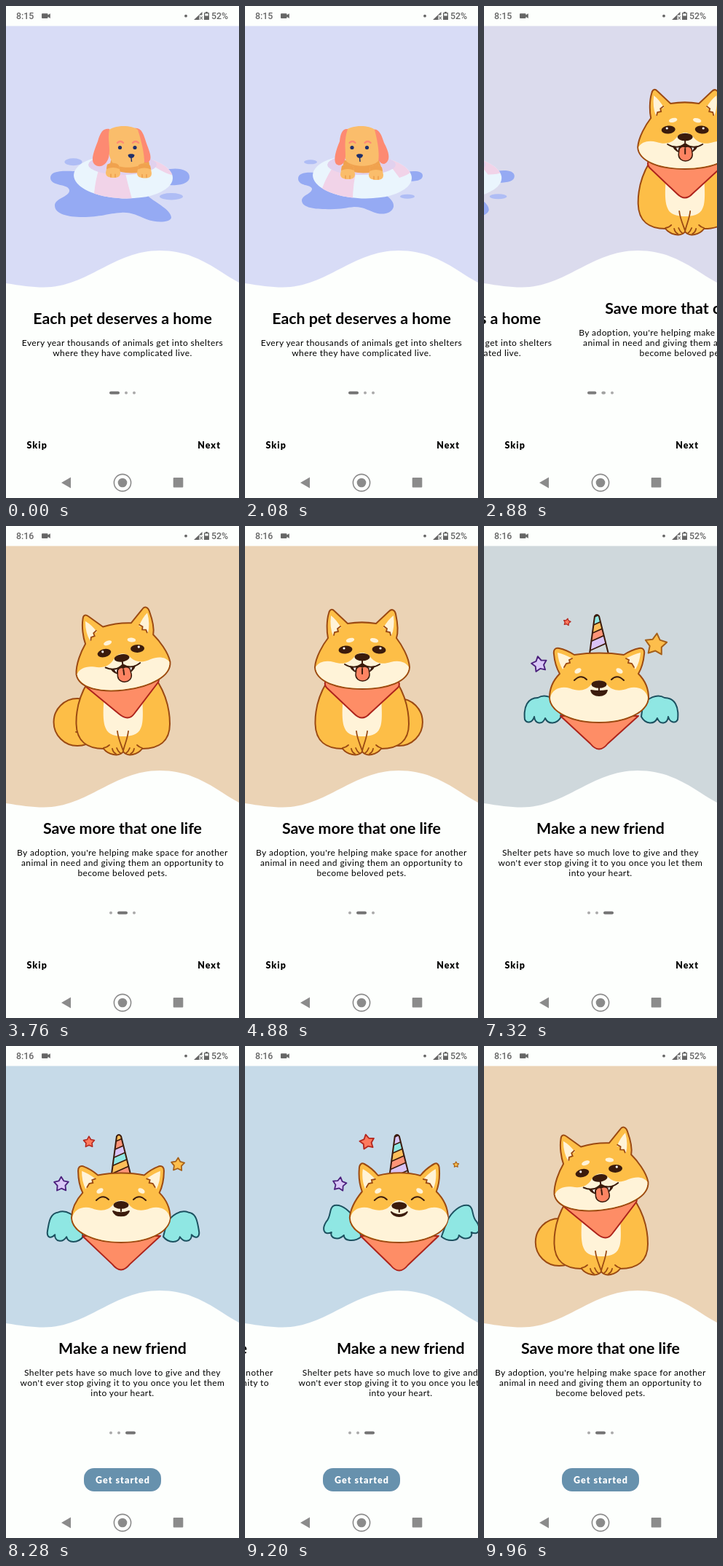
Recreate the animation shown at these times as an HTML page. Size 320 px wide and 676 px high, loop 10000 ms.

```html
<!DOCTYPE html>
<html lang="en">
<head>
<meta charset="utf-8">
<title>Pet adoption onboarding</title>
<style>
html, body { margin: 0; width: 100%; height: 100%; overflow: hidden; background: #fdfffd; }
svg { display: block; width: 100vw; height: 100vh; }
text { font-family: Lato, sans-serif; fill: #000; }
.mid { text-anchor: middle; }
.title { font-size: 21.33px; font-weight: 700; }
.body { font-size: 12px; letter-spacing: .42px; }
.btn { font-size: 12.44px; font-weight: 900; letter-spacing: 1.05px; }
.bar { font-family: Roboto, sans-serif; font-size: 12.4px; font-weight: 500; fill: #666; }
.fur { fill: #fdbe47; stroke: #9b4a13; stroke-width: 2; stroke-linejoin: round; }
.line { fill: none; stroke: #9b4a13; stroke-width: 1.8; stroke-linecap: round; }
.scarf { fill: #fe8d66; stroke: #ad241c; stroke-width: 2; stroke-linejoin: round; }
.cream { fill: #fff3d8; }
.dark { fill: #3b1b0c; }
.ink { fill: none; stroke: #3b1b0c; stroke-width: 2; stroke-linecap: round; }
.wing { fill: #8fe7e3; stroke: #1c5160; stroke-width: 2; stroke-linejoin: round; }
.pup { fill: #fabd6b; }
.ear { fill: #fd8a72; }
.navy { fill: #1f2f6b; }
.claw { fill: none; stroke: #ea9443; stroke-width: 1.2; stroke-linecap: round; }
</style>
</head>
<body>
<svg viewBox="0 0 320 676" preserveAspectRatio="none">
  <defs>
    <clipPath id="ringClip"><ellipse cx="161" cy="234.5" rx="68" ry="30" transform="rotate(2 161 235)"/></clipPath>
    <clipPath id="hornClip"><path d="M145 176 L152 124 Q155 120 158 124 L171 176Z"/></clipPath>
    <g id="paw">
      <path class="pup" d="M-8 -9 C-3 -12 5 -12 8 -8 L10 2 C10 8 6 9 1 9 C-6 9 -10 7 -10 2Z"/>
      <path d="M-8 -9 C-3 -12 5 -12 8 -8 L9 -3 Q0 -7 -9 -3Z" fill="#f0a24e"/>
      <path class="claw" d="M-3 4V8M3 4V8"/>
    </g>
    <g id="innerEar">
      <path class="cream" d="M118 123 Q126 129 132 140 L127 141 L128 145 L123 146 L121 151 Q116 139 118 123Z"/>
      <path class="line" d="M131 138 L127 141 L128 145 L123 146 L122 150" stroke-width="1.3"/>
    </g>
  </defs>

  <rect id="bg" width="320" height="676"/>
  <path d="M0 381 C20 384 35 386.5 52 386.5 C112 386.5 148 336 211 336 C262 336 290 364 320 380 V676 H0Z" fill="#fdfffd"/>

  <g id="page0">
    <path id="pool" fill="#95aaf3"/>
    <ellipse id="poolL" fill="#afbdf5"/>
    <ellipse id="poolR" fill="#afbdf5"/>
    <g clip-path="url(#ringClip)">
      <rect x="90" y="200" width="142" height="70" fill="#eaf5fd"/>
      <path id="bandA" fill="#f1d3e8"/>
      <path id="bandB" fill="#f1d3e8"/>
    </g>
    <ellipse cx="160" cy="218" rx="47" ry="14" fill="#e1d1ee"/>
    <path id="chest" fill="#f0a24e"/>
    <path id="earR" class="ear"/>
    <path id="face" class="pup"/>
    <path id="earL" class="ear"/>
    <g id="look">
      <circle class="navy" cx="-9.5" cy="194.5" r="2.6"/>
      <circle class="navy" cx="11" cy="194.5" r="2.6"/>
      <path d="M-13 188 Q-9 184 -5 188M8 188 Q12 184 16 188" fill="none" stroke="#fd8a72" stroke-width="2.4" stroke-linecap="round"/>
    </g>
    <g id="nose">
      <path class="navy" d="M-4.5 205 C-4.5 202.5 4.5 202.5 4.5 205 C4 208 1.5 209 0 209 C-1.5 209 -4 208 -4.5 205Z"/>
      <path d="M0 208 L.5 214" stroke="#1f2f6b" stroke-width="1.4"/>
    </g>
    <use id="pawL" href="#paw"/>
    <use id="pawR" href="#paw"/>
    <text class="mid title" x="160" y="437">Each pet deserves a home</text>
    <text class="mid body"><tspan x="160" y="467">Every year thousands of animals get into shelters</tspan><tspan x="160" y="481.3">where they have complicated live.</tspan></text>
  </g>

  <g id="page1">
    <g id="tail">
      <circle class="fur" cx="160" cy="269.5" r="32.5"/>
      <path class="line" d="M158 283 Q164 284 168 281"/>
    </g>
    <path class="fur" d="M112 215 C103 230 96 250 96.5 272 C97 296 112 306 134 306 C140 314 155 318 161 310 C167 318 181 314 187 306 C210 306 225 296 225 272 C225 250 218 230 209 215Z"/>
    <path class="cream" d="M135 232 C133 255 133 270 137 278 C140 287 152 289 161 289 C170 289 182 287 185 278 C189 270 188 255 187 232Z"/>
    <path class="line" d="M153 282 C154 292 158 300 161 309 C163 300 167 292 168 282M134 305 Q139 304 142 301M187 305 Q183 304 180 301M146 306 Q147 311 151 313M152 305 Q154 310 157 312M176 306 Q175 311 171 313M170 305 Q168 310 165 312"/>
    <path id="scarf1" class="scarf"/>
    <g id="head1">
      <path class="fur" d="M141 134 C153 132 168 132 180 134 L198 117 C202 113 206 116 207 121 C210 135 210 148 208 154 C215 163 225 180 226 194 C225 214 195 224 161 224 C127 224 97 214 96 194 C97 180 107 163 114 154 C112 145 112 130 115 120 C116 115 119 113 123 117Z"/>
      <path class="cream" d="M97 194 C101 186 112 184 122 187 C134 191 143 188 149 181 C153 176 157 174 161 174 C165 174 169 176 173 181 C179 188 188 191 200 187 C210 184 221 186 225 194 C224 213 195 223 161 223 C127 223 98 213 97 194Z"/>
      <use href="#innerEar"/>
      <use href="#innerEar" transform="matrix(-1 0 0 1 322 0)"/>
      <ellipse class="cream" cx="144.5" cy="157" rx="5.8" ry="3" transform="rotate(-14 144 157)"/>
      <ellipse class="cream" cx="177.5" cy="157" rx="5.8" ry="3" transform="rotate(14 177 157)"/>
      <ellipse class="dark" cx="138" cy="170" rx="9.5" ry="5.5" transform="rotate(-6 138 170)"/>
      <ellipse class="dark" cx="184" cy="170" rx="9.5" ry="5.5" transform="rotate(6 184 170)"/>
      <circle cx="136" cy="168" r="1.6" fill="#fff"/><circle cx="186" cy="168" r="1.6" fill="#fff"/>
      <ellipse class="dark" cx="161" cy="180" rx="10.5" ry="5.3"/>
      <path class="dark" d="M143 192 Q153 195 161 189 Q169 195 179 192 Q174 203 161 203 Q148 203 143 192Z"/>
      <path d="M148 193.5 L151 199 L153 193Z M169 193 L171 199 L174 193.5Z" fill="#fff"/>
      <path d="M153 196 Q157 191 161 194 Q166 191 170 196 L171 204 C171 216 152 216 152 204Z" fill="#fd8462" stroke="#3b1b0c" stroke-width="1.5"/>
      <path class="ink" d="M137 190 Q150 198 161 189 Q172 198 185 190M161 184V189M161 196V203" stroke-width="1.7"/>
    </g>
    <text class="mid title" x="160" y="423">Save more that one life</text>
    <text class="mid body"><tspan x="160" y="453">By adoption, you're helping make space for another</tspan><tspan x="160" y="467.2">animal in need and giving them an opportunity to</tspan><tspan x="160" y="481.4">become beloved pets.</tspan></text>
  </g>

  <g id="page2">
    <path id="starR" fill="#fd7a5e" stroke="#b4281f"/>
    <path id="starO" fill="#fdbe4c" stroke="#a5601a"/>
    <path id="starP" fill="#dac8f7" stroke="#4b1f7c"/>
    <path id="wingL" class="wing"/>
    <path id="wingR" class="wing" transform="matrix(-1 0 0 1 322 0)"/>
    <g clip-path="url(#hornClip)" id="horn"></g>
    <path d="M145 176 L152 124 Q155 120 158 124 L171 176" fill="none" stroke="#3b1b0c" stroke-width="2"/>
    <path id="scarf2" class="scarf"/>
    <path id="head2" class="fur"/>
    <path class="cream" d="M91 236 C93 224 106 219 118 223 C130 228 141 226 147 218 C150 214 154 212 158 212 C162 212 166 214 169 218 C175 226 186 228 198 223 C210 219 223 224 225 236 C224 255 195 269 158 269 C121 269 92 255 91 236Z"/>
    <path id="ears2" class="cream"/>
    <path id="tufts2" class="line" stroke-width="1.3"/>
    <ellipse class="cream" cx="129" cy="199" rx="5" ry="3.2" transform="rotate(-30 129 199)"/>
    <ellipse class="cream" cx="186" cy="199" rx="5" ry="3.2" transform="rotate(30 186 199)"/>
    <path class="ink" d="M124 212 Q133 203 141 211M175 211 Q183 203 192 212" stroke-width="2.3"/>
    <g id="snout">
      <ellipse class="dark" cx="158" cy="217.5" rx="10.5" ry="5.3"/>
      <path class="ink" d="M158 221V226"/>
    </g>
    <path id="mouth" class="dark" stroke="#3b1b0c" stroke-width="1.8" stroke-linejoin="round"/>
    <text class="mid title" x="160" y="423">Make a new friend</text>
    <text class="mid body"><tspan x="160" y="453">Shelter pets have so much love to give and they</tspan><tspan x="160" y="467.2">won't ever stop giving it to you once you let them</tspan><tspan x="160" y="481.4">into your heart.</tspan></text>
  </g>

  <rect id="dot0" y="529.5" height="4" rx="2"/>
  <rect id="dot1" y="529.5" height="4" rx="2"/>
  <rect id="dot2" y="529.5" height="4" rx="2"/>

  <g id="links">
    <text class="btn" x="28.5" y="607.5">Skip</text>
    <text class="btn" x="295" y="607.5" text-anchor="end">Next</text>
  </g>
  <g id="start">
    <rect x="107" y="580" width="106" height="32" rx="14" fill="#6791ad"/>
    <text class="btn mid" x="160.5" y="600.5" style="fill:#fff">Get started</text>
  </g>

  <rect width="320" height="27.5" fill="#fdfffd"/>
  <text id="clock" class="bar" x="14" y="18"></text>
  <text class="bar" x="282" y="18">52%</text>
  <g fill="#666">
    <path d="M50 10.3H56.5Q57.5 10.3 57.5 11.3V12.6L60.8 10.3V17L57.5 14.7V16Q57.5 17 56.5 17H50Q49 17 49 16V11.3Q49 10.3 50 10.3Z"/>
    <circle cx="247" cy="13.7" r="1.9"/>
    <path d="M258 19 L269.5 8V12.5H265.5V19Z"/>
    <path d="M266.5 14.5L270 18.5M270 14.5L266.5 18.5" stroke="#666" stroke-width="1.1"/>
    <path d="M274 8H277V9.2H279V19H272V9.2H274Z"/>
    <rect x="273.3" y="10.5" width="4.4" height="3" fill="#fdfffd"/>
  </g>
  <g fill="#8b8b8b">
    <path d="M76 655 L89 647.5V662.5Z"/>
    <circle cx="160" cy="655" r="6.3"/>
    <circle cx="160" cy="655" r="11.6" fill="none" stroke="#8b8b8b" stroke-width="1.6"/>
    <rect x="229.7" y="648" width="13.6" height="13.6" rx="1"/>
  </g>
</svg>
<script>
const LOOP = 10000;
const $ = id => document.getElementById(id);
const set = (id, attrs) => { for (const k in attrs) $(id).setAttribute(k, attrs[k]); };
const lerp = (a, b, k) => a + (b - a) * k;
const ramp = (t, a, b) => Math.min(1, Math.max(0, (t - a) / (b - a)));
const ease = u => u * u * (3 - 2 * u);
const wave = (t, period) => .5 - .5 * Math.cos(2 * Math.PI * t / period);
const NUM = /-?\d+(\.\d+)?/g;
const mix = (a, b, k) => {
  const n = b.match(NUM);
  let i = 0;
  return a.replace(NUM, v => lerp(+v, +n[i++], k).toFixed(2));
};

// page changes: start, end, from, to
const MOVES = [[2560, 3100, 0, 1], [6760, 7300, 1, 2], [9020, 9715, 2, 1]];
const COLORS = [[216, 220, 246], [235, 211, 181], [198, 218, 232]];

// two poses per shape
const MORPH = {
  pool: ["M61 236 C61 228 72 226 92 227 L225 224 C240 222 252 226 252 235 C252 244 238 247 225 246 C210 246 190 252 196 262 C205 270 227 280 227 291 C225 298 205 298 193 293 C180 288 172 283 158 284 C140 285 130 290 105 290 C85 290 67 286 67 274 C67 264 88 262 87 253 C86 244 61 248 61 236Z",
    "M73 237 C73 230 82 228 96 229 L222 228 C234 226 244 227 244 233 C244 240 234 241 222 241 C208 241 190 248 192 258 C198 264 205 268 204 276 C202 284 192 287 182 285 C170 282 165 276 150 276 C138 277 130 280 110 279 C92 279 78 276 78 267 C78 260 92 258 92 251 C91 245 73 248 73 237Z"],
  bandA: ["M127 226 L164 230 Q168 248 174 268 L120 268 Q122 242 127 226Z", "M119 224 L152 230 Q148 248 148 268 L104 256 Q110 238 119 224Z"],
  bandB: ["M192 204 L232 200 L232 233 Q222 232 206 222Z", "M188 204 L226 200 L232 224 Q226 232 212 236Z"],
  chest: ["M144 212 H196 L198 224 Q170 236 142 222Z", "M136 212 H184 L188 224 Q160 236 134 222Z"],
  earR: ["M176 168 C186 166 189 176 193 189 C198 202 202 212 194 215 C186 216 184 204 178 192Z", "M174 170 C184 167 187 176 191 188 C198 201 201 213 191 217 C183 217 180 204 174 192Z"],
  face: ["M139 172 C148 163 172 163 181 170 C186 185 190 203 190 215 C182 224 152 224 146 215 C140 205 138 190 139 172Z", "M136 172 C146 163 170 163 178 170 C182 185 185 203 183 213 C175 222 147 222 139 213 C135 203 134 190 136 172Z"],
  earL: ["M142 169 C134 168 130 172 126 186 C121 199 116 211 121 217 C128 224 138 219 141 208 C144 195 139 184 142 169Z", "M141 169 C134 168 131 175 130 186 C125 198 121 211 125 217 C131 222 138 216 138 206 C138 194 136 184 141 169Z"],
  scarf1: ["M112 211 C109 214 109 219 112 222 L150 258 Q161 269 171 258 L210 222 C213 219 212 214 209 211Z", "M111 212 C108 214 107 218 110 221 L155 258 Q168 269 176 258 L208 216 C211 213 210 209 207 207Z"],
  wingL: ["M104 247 C98 236 84 230 74 236 C60 236 54 248 56 266 C59 272 67 270 69 262 C70 272 80 274 84 264 C88 273 100 273 106 262Z", "M98 240 C92 228 80 217 69 219 C61 222 65 234 58 241 C52 250 53 261 65 256 C62 264 74 268 82 260 C82 268 96 270 106 262Z"],
  scarf2: ["M105 261 L146 299 Q158 314 170 299 L212 261Z", "M105 261 L146 301 Q158 316 170 301 L212 261Z"],
  head2: ["M124 177 C145 174 171 174 192 177 Q203 170 213 168 C218 167 221 170 220 176 C219 188 216 196 212 203 C220 211 226 222 226 236 C225 256 195 270 158 270 C121 270 91 256 90 236 C90 222 96 211 104 203 C100 196 97 188 96 176 C95 170 98 167 103 168 Q113 170 124 177Z",
    "M129 178 C147 173 170 173 187 178 Q195 168 206 162 C210 160 213 163 213 169 C214 182 212 192 209 200 C220 211 225 222 225 236 C224 257 195 270 158 270 C121 270 91 257 90 236 C91 222 98 211 107 200 C104 192 102 182 103 169 C103 163 106 160 110 162 Q121 168 129 178Z"],
  ears2: ["M101 174 Q110 176 121 182 L117 184 L118 188 L113 189 L108 197 Q102 187 101 174ZM215 174 Q206 176 195 182 L199 184 L198 188 L203 189 L208 197 Q214 187 215 174Z",
    "M108 169 Q117 174 125 183 L120 184 L121 188 L116 189 L111 196 Q106 183 108 169ZM208 169 Q199 174 191 183 L196 184 L195 188 L200 189 L205 196 Q210 183 208 169Z"],
  tufts2: ["M121 182 L117 184 L118 188 L113 189 L110 194M195 182 L199 184 L198 188 L203 189 L206 194", "M125 183 L120 184 L121 188 L116 189 L113 194M191 183 L196 184 L195 188 L200 189 L203 194"],
  mouth: ["M147 226 Q158 228 169 226 Q167 233 158 233 Q149 233 147 226Z", "M147 228 Q158 236 169 228 Q166 234 158 234 Q150 234 147 228Z"]
};
const morph = (ids, k) => ids.split(" ").forEach(id => set(id, { d: mix(MORPH[id][0], MORPH[id][1], k) }));

const star = (x, y, r, turn) => {
  let d = "";
  for (let i = 0; i < 10; i++) {
    const a = turn + i * Math.PI / 5, q = i % 2 ? r * .55 : r;
    d += (i ? "L" : "M") + (x + q * Math.sin(a)).toFixed(2) + " " + (y - q * Math.cos(a)).toFixed(2);
  }
  return d + "Z";
};
const drawStar = (id, x, y, r, turn) =>
  set(id, { d: star(x, y, r, turn), "stroke-width": Math.min(2, .8 + r * .1), "stroke-linejoin": "round" });

const STRIPES = ["#8fe7e3", "#fdbe5a", "#fd9478", "#d9c3f6"];
Array.from({ length: 12 }, (_, i) => {
  const p = document.createElementNS("http://www.w3.org/2000/svg", "path");
  p.setAttribute("d", "M140 6 L176 -10 V2 L140 18Z");
  p.setAttribute("transform", `translate(0 ${80 + i * 10.5})`);
  p.setAttribute("fill", STRIPES[i % 4]);
  p.setAttribute("stroke", "#3b1b0c");
  p.setAttribute("stroke-width", 1.7);
  const g = $("bands") || $("horn").appendChild(document.createElementNS(p.namespaceURI, "g"));
  g.id = "bands";
  g.append(p);
});

function puppy(t) {
  const k = wave(t, 4160);
  morph("pool bandA bandB chest earR face earL", k);
  set("poolL", { cx: lerp(92.5, 90, k), cy: 214.3, rx: lerp(12, 9, k), ry: lerp(5, 3, k) });
  set("poolR", { cx: lerp(227, 223, k), cy: 261.7, rx: lerp(16, 10, k), ry: lerp(4.7, 3, k) });
  set("look", { transform: `translate(${lerp(166, 156.5, k)})` });
  set("nose", { transform: `translate(${lerp(172, 157.5, k)})` });
  set("pawL", { transform: `translate(${lerp(147, 141, k)} ${lerp(227, 229, k)})` });
  set("pawR", { transform: `translate(${lerp(190, 180, k)} ${lerp(227.5, 230, k)})` });
}

function shiba(t) {
  const p = (t - (t < 9000 ? 2550 : 9050) + 3000) % 3000;
  const k = ease(ramp(p, 600, 900)) - ease(ramp(p, 1900, 2300));
  set("tail", { transform: `translate(${-63 * Math.cos(2 * Math.PI * (p - 1125) / 3000)})` });
  set("head1", { transform: `translate(${4 * k} ${k}) rotate(${-7.7 * k} 161 224)` });
  morph("scarf1", k);
}

function unicorn(t) {
  const s = t - 7320, k = wave(s, 1253), q = wave(s, 3760);
  morph("wingL scarf2 head2 ears2 tufts2 mouth", k);
  set("wingR", { d: $("wingL").getAttribute("d") });
  set("snout", { transform: `translate(0 ${2 * k})` });
  const shift = ((s * .028 % 42) + 42) % 42;
  set("bands", { transform: `translate(0 ${shift - 40})` });
  drawStar("starR", 114, 132, lerp(5, 10.5, q), lerp(.2, -.2, q));
  drawStar("starO", 236, 163, lerp(15.5, 4, q), lerp(.1, 0, q));
  drawStar("starP", 76, 190, lerp(11, 9.8, q), lerp(-.2, .15, q));
}

function draw(t) {
  let pos = 0, color = COLORS[0];
  const active = [1, 0, 0];
  for (const [a, b, from, to] of MOVES) {
    if (t < a) break;
    const half = (a + b) / 2, d = ease(ramp(t, half, half + 200));
    const c = ramp(t, half, half + 380);
    pos = lerp(from, to, ease(ramp(t, a, b)));
    color = COLORS[from].map((v, i) => Math.round(lerp(v, COLORS[to][i], c)));
    active.fill(0);
    active[from] = 1 - d;
    active[to] = d;
  }
  set("bg", { fill: `rgb(${color})` });
  for (let i = 0; i < 3; i++) {
    const x = (i - pos) * 320;
    set("page" + i, { transform: `translate(${x.toFixed(2)})`, display: Math.abs(x) < 320 ? "inline" : "none" });
  }
  let x = 142;
  active.forEach((a, i) => {
    const w = 4 + 10 * a, g = Math.round(lerp(170, 115, a));
    set("dot" + i, { x, width: w, fill: `rgb(${g},${g},${g})` });
    x += w + 7;
  });
  const done = ramp(t, 7400, 7600);
  set("links", { opacity: 1 - done });
  set("start", { opacity: done });
  $("clock").textContent = t < 3120 ? "8:15" : "8:16";
  puppy(t);
  shiba(t);
  unicorn(t);
}

const begin = performance.now();
function tick() {
  draw((performance.now() - begin) % LOOP);
  requestAnimationFrame(tick);
}
tick();
</script>
</body>
</html>
```
